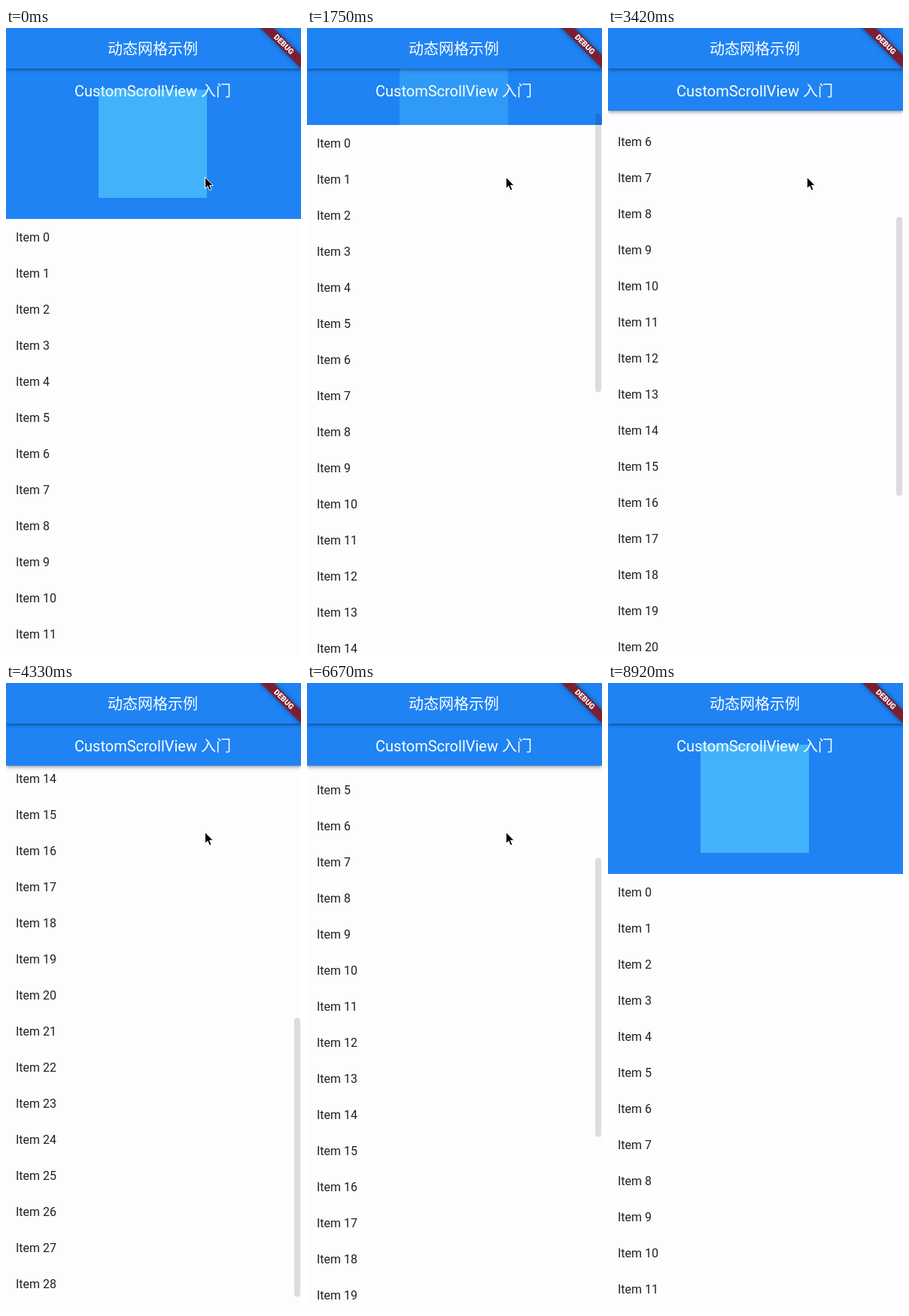
Animation, 392 px wide and 834 px high, one loop 9.41 s. Source, as an HTML page:

```html
<!DOCTYPE html>
<html lang="zh-CN">
<head>
<meta charset="utf-8">
<title>动态网格示例</title>
<style>
  html, body { margin: 0; width: 100%; height: 100%; overflow: hidden; }
  body {
    position: relative;
    background: #fdfcff;
    font-family: Roboto, "Noto Sans CJK SC", "Noto Sans CJK", sans-serif;
  }
  body div, svg { position: absolute; }
  .bar { left: 0; width: 100%; background: #1f83f4; }
  .title {
    left: -1px; width: 392px; height: 56px;
    font-size: 20px; line-height: 56px;
    text-align: center; white-space: nowrap; color: #fff;
  }
  #app { top: 0; height: 54px; }
  #app .title { top: 0; }
  #header { top: 54px; overflow: hidden; }
  #header .title { top: 2px; }
  #app, #header.raised {
    box-shadow: 0 2px 4px -1px rgba(0, 0, 0, .35), 0 3px 5px rgba(0, 0, 0, .14);
  }
  #badge { left: 123px; top: 28px; width: 144px; height: 144px; background: #42b3fb; }
  #list { left: 13px; top: 255px; font-size: 16px; line-height: 48px; color: #212121; }
  #list p { margin: 0; height: 48px; white-space: nowrap; }
  #thumb {
    left: 383px; top: 54px; width: 8px; height: 371px;
    border-radius: 4px; background: rgba(0, 0, 0, .13);
  }
  #ribbon {
    left: 353px; top: 26px; width: 80px; height: 12px;
    transform-origin: 40px -28px; transform: rotate(45deg);
    background: #7a1f33; box-shadow: 0 0 6px rgba(0, 0, 0, .5);
    font-size: 10.2px; font-weight: 900; line-height: 12px;
    text-align: center; color: #fff;
  }
  #cursor { left: 262px; top: 196px; }
</style>
</head>
<body>
<div id="list"></div>
<div id="header" class="bar">
  <div id="badge"></div>
  <div class="title">CustomScrollView 入门</div>
</div>
<div id="app" class="bar"><div class="title">动态网格示例</div></div>
<div id="thumb"></div>
<div id="ribbon">DEBUG</div>
<svg id="cursor" width="16" height="24" viewBox="-2 -2 16 24">
  <path d="M.5 .5V15.5L4 12.3 6.4 18 9 17 6.6 11.4H11.2Z" stroke="#fff"/>
</svg>
<script>
const LOOP = 9410, FPS = 12;
const COLLAPSE = 144, EXPANDED = 200, MAX_SCROLL = 860, THUMB_TRAVEL = 409;
const FADE = 230, FADE_DELAY = 600;

// Each gesture is a path of [time in ms, scroll offset] points.
const down = [[583, 0], [1083, 28], [2417, 222], [3417, 415], [4417, MAX_SCROLL]];
const up = [[5333, MAX_SCROLL], [5833, 676], [7417, 106], [7833, 0]];

const $ = id => document.getElementById(id);
const [list, header, badge, thumb, cursor] =
  ["list", "header", "badge", "thumb", "cursor"].map($);

for (let i = 0; i < 30; i++) {
  const row = document.createElement("p");
  row.textContent = "Item " + i;
  list.append(row);
}

const ramp = (t, from, length) => Math.min(1, Math.max(0, (t - from) / length));

function follow(path, t) {
  return path.reduce((value, [time, next], i) => {
    if (!i) return next;
    const before = path[i - 1][0];
    return value + (next - path[i - 1][1]) * ramp(t, before, time - before);
  }, 0);
}

// The scrollbar shows during a gesture and lingers a little after it.
function thumbOpacity(path, t) {
  const end = path[path.length - 1][0];
  return ramp(t, path[0][0], FADE) - ramp(t, end + FADE_DELAY, FADE);
}

function draw(time) {
  const t = Math.floor(time * FPS / 1000 + .05) * 1000 / FPS;
  const scroll = Math.round(follow(t < up[0][0] ? down : up, t));
  const shrink = Math.min(scroll, COLLAPSE);

  list.style.transform = `translateY(${-scroll}px)`;
  header.style.height = EXPANDED - shrink + "px";
  header.classList.toggle("raised", scroll >= COLLAPSE);

  // The backdrop moves at a quarter speed and fades near full collapse.
  badge.style.transform = `translateY(${-shrink / 4}px)`;
  badge.style.opacity = Math.min(1, (1 - shrink / COLLAPSE) / .28);

  thumb.style.transform = `translateY(${scroll / MAX_SCROLL * THUMB_TRAVEL}px)`;
  thumb.style.opacity = thumbOpacity(down, t) + thumbOpacity(up, t);

  const leave = ramp(t, 8750, 167);
  cursor.style.transform = `translate(${leave * 66}px, ${leave * -225}px)`;
}

const start = performance.now();
function tick() {
  draw((performance.now() - start) % LOOP);
  requestAnimationFrame(tick);
}
tick();
</script>
</body>
</html>
```
